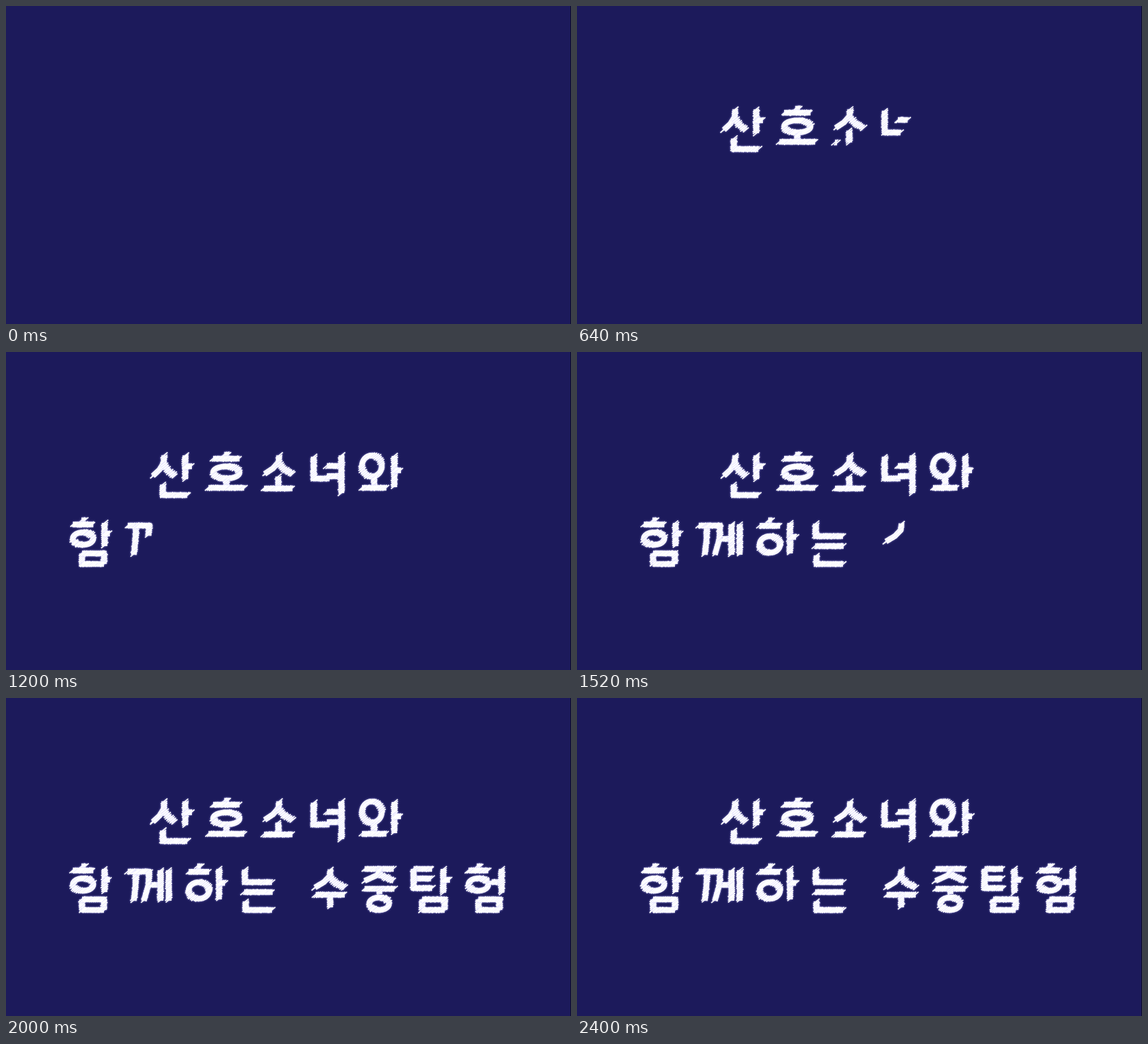
An HTML page with a canvas that plays this animation: 854 px wide and 480 px high, repeating every 2480 ms.

```html
<!DOCTYPE html>
<html lang="ko">
<head>
<meta charset="utf-8">
<title>산호소녀와 함께하는 수중탐험</title>
<style>
  html, body { margin: 0; width: 100%; height: 100%; overflow: hidden; background: #1c1a5b; }
  canvas { display: block; }
</style>
</head>
<body>
<canvas id="stage" width="854" height="480" role="img" aria-label="산호소녀와 함께하는 수중탐험"></canvas>
<script>
const LOOP = 2480, STEP = 80, WRITE = 160;
const ctx = document.getElementById('stage').getContext('2d');

// Strokes in percent of the letter's box; "o38" is a ring from 38% down to the bottom.
const JAMO = {
  'ㅅ': ['52,0 50,36 30,70 0,100', '50,42 70,75 100,100'],
  'ㅈ': ['0,0 100,0', '52,0 45,50 0,100', '52,48 100,100'],
  'ㄴ': ['0,0 0,100 100,100'],
  'ㅁ': ['0,0 0,100', '0,0 100,0 100,100', '0,100 100,100'],
  'ㅇ': ['o0'],
  'ㅎ': ['42,0 60,0', '0,17 100,17', 'o49'],
  'ㅌ': ['0,0 100,0', '0,50 94,50', '0,0 0,100 100,100'],
  'ㄲ': ['0,0 38,0 36,45 28,100', '38,0 98,0 95,45 74,100'],
  'ㅏ': ['0,0 0,100', '0,46 100,46'],
  'ㅓ': ['0,55 100,55', '100,0 100,100'],
  'ㅕ': ['0,28 100,28', '0,55 100,55', '100,0 100,100'],
  'ㅔ': ['0,48 52,48', '52,0 52,100', '100,0 100,100'],
  'ㅗ': ['50,0 50,100', '0,100 100,100'],
  'ㅜ': ['0,0 100,0', '50,0 50,100'],
  'ㅡ': ['0,0 100,0']
};

// Start time, then each letter as: sign x y width height.
const WORDS = [
  [120, 'ㅅ 222 156 33 31', 'ㅏ 271 156 10 36', 'ㄴ 237 200 37 16'],
  [330, 'ㅎ 313 155 40 36', 'ㅗ 306 194 54 11'],
  [530, 'ㅅ 391 156 42 28', 'ㅗ 390 188 43 18'],
  [568, 'ㄴ 465 158 24 33', 'ㅕ 485 156 22 57'],
  [780, 'ㅇ 538 156 30 32', 'ㅗ 538 190 37 15', 'ㅏ 587 157 10 47'],
  [960, 'ㅎ 101 254 31 37', 'ㅏ 149 258 8 35', 'ㅁ 115 304 33 16'],
  [1136, 'ㄲ 184 262 33 44', 'ㅔ 220 260 26 46'],
  [1240, 'ㅎ 276 254 31 49', 'ㅏ 322 258 9 46'],
  [1350, 'ㄴ 361 259 41 19', 'ㅡ 360 293 43 1', 'ㄴ 362 307 40 13'],
  [1472, 'ㅅ 467 259 45 27', 'ㅜ 468 297 44 19'],
  [1600, 'ㅈ 542 258 44 18', 'ㅜ 542 288 45 8', 'ㅇ 549 301 30 19'],
  [1720, 'ㅌ 616 258 28 29', 'ㅏ 661 258 10 36', 'ㅁ 629 304 34 16'],
  [1840, 'ㅎ 699 254 30 37', 'ㅓ 734 258 15 36', 'ㅁ 714 304 32 16']
];

function ring(top) {
  const ry = (100 - top) / 2;
  return Array.from({ length: 33 }, (_, i) => {
    const a = -Math.PI / 2 - i / 32 * Math.PI * 2;
    return [50 + 50 * Math.cos(a), top + ry + ry * Math.sin(a)];
  });
}

function parse(stroke) {
  return stroke[0] === 'o'
    ? ring(+stroke.slice(1))
    : stroke.split(' ').map(p => p.split(',').map(Number));
}

// Points about 1.5px apart, so that a stroke can be cut at any length.
function resample(points) {
  const out = [points[0]];
  for (let i = 1; i < points.length; i++) {
    const [ax, ay] = points[i - 1], [bx, by] = points[i];
    const n = Math.max(1, Math.round(Math.hypot(bx - ax, by - ay) / 1.5));
    for (let k = 1; k <= n; k++) out.push([ax + (bx - ax) * k / n, ay + (by - ay) * k / n]);
  }
  return out;
}

function build([start, ...parts]) {
  const strokes = parts.flatMap(part => {
    const [sign, ...box] = part.split(' ');
    const [x, y, w, h] = box.map(Number);
    return JAMO[sign].map(s =>
      resample(parse(s).map(([px, py]) => [x + px * w / 100, y + py * h / 100])));
  });
  return { start, strokes, total: strokes.reduce((n, s) => n + s.length, 0) };
}

const glyphs = WORDS.map(build);

function noise(n) {
  const v = Math.sin(n * 12.9898) * 43758.5453;
  return v - Math.floor(v);
}

// A solid core with slanted chalk hatching over it.
function chalk(points, seed) {
  ctx.beginPath();
  points.forEach(([x, y]) => ctx.lineTo(x, y));
  ctx.lineWidth = 8.5;
  ctx.stroke();

  ctx.beginPath();
  for (let i = 0; i < points.length; i += 2) {
    const [x, y] = points[i];
    const r = 5.4 + 1.8 * noise(seed + i);
    const shift = noise(seed + i + .5) - .5;
    const dx = r * .77, dy = r * .64;
    ctx.moveTo(x - dx + shift, y + dy);
    ctx.lineTo(x + dx + shift, y - dy);
  }
  ctx.lineWidth = 1.8;
  ctx.stroke();
}

function draw(now) {
  const tick = Math.floor(now % LOOP / STEP);
  const time = tick * STEP;
  ctx.shadowBlur = 0;
  ctx.fillStyle = '#1c1a5b';
  ctx.fillRect(0, 0, 854, 480);
  ctx.fillStyle = '#0c0b28';
  ctx.fillRect(853, 0, 1, 480);
  ctx.strokeStyle = '#fff';
  ctx.lineJoin = 'round';
  ctx.shadowColor = 'rgba(190, 185, 255, .6)';
  ctx.shadowBlur = 3;
  glyphs.forEach((glyph, g) => {
    const part = Math.min(1, Math.max(0, (time - glyph.start) / WRITE));
    let left = Math.round(part * glyph.total);
    glyph.strokes.forEach((stroke, s) => {
      if (left > 1) chalk(stroke.slice(0, left), g * 97 + s * 31 + tick * 7);
      left -= stroke.length;
    });
  });
}

const origin = performance.now();
function loop() {
  draw(performance.now() - origin);
  requestAnimationFrame(loop);
}
loop();
</script>
</body>
</html>
```
